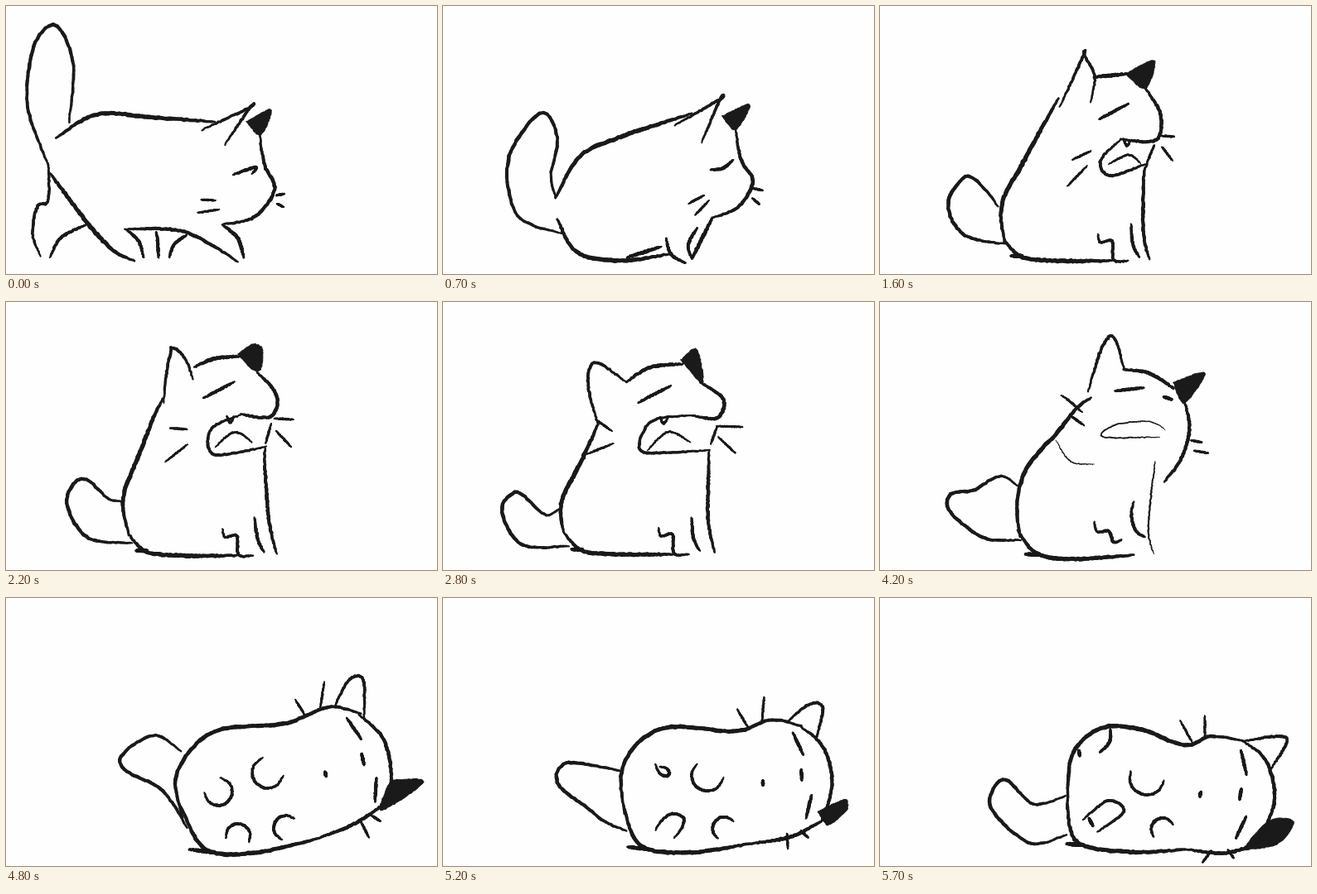
Write an HTML page with a canvas that moves like this. It is 520 px wide and 324 px high and loops after 5.8 s.

```html
<!DOCTYPE html>
<html lang="en">
<head>
<meta charset="utf-8">
<title>Sleepy cat</title>
<style>
html, body { margin: 0; width: 100%; height: 100%; overflow: hidden; background: #fefefe; }
canvas { display: block; }
</style>
</head>
<body>
<canvas id="stage" width="520" height="324"></canvas>
<script>
const LOOP = 5800, STEP = 100, SAMPLES = 60, FLOOR = 304;
const INK = '#1a1a1a', PAPER = '#fefefe';
const ctx = document.getElementById('stage').getContext('2d');

const mix = (a, b, k) => a + (b - a) * k;
const clamp = v => Math.max(0, Math.min(1, v));
const mapPose = (pose, fn) =>
  Object.fromEntries(Object.entries(pose).map(([name, pts]) => [name, pts.map(fn)]));

// A repeated point makes a corner.
const points = text => text.split(' ').map(p => p.split(',').map(Number));
const pose = parts =>
  Object.fromEntries(Object.entries(parts).map(([name, p]) => [name, Array.isArray(p) ? p : points(p)]));

// A leg bends at the knee on its way from the hip to the floor.
const leg = (x, y, foot) => [[x, y], [mix(x, foot, .7), mix(y, FLOOR, .4)], [foot, FLOOR]];

// A paw is part of a circle, with its angles in degrees.
const paw = (x, y, r, from, to) => [0, 1, 2, 3, 4, 5].map(i => {
  const a = mix(from, to, i / 5) * Math.PI / 180;
  return [x + r * Math.cos(a), y + r * Math.sin(a)];
});

const shift = (parts, dx, dy) => mapPose(parts, ([x, y]) => [x + dx, y + dy]);

// Turns parts by an angle while carrying one point to another.
const roll = (parts, angle, [x0, y0], [x1, y1]) => mapPose(parts, ([x, y]) => [
  x1 + (x - x0) * Math.cos(angle) - (y - y0) * Math.sin(angle),
  y1 + (x - x0) * Math.sin(angle) + (y - y0) * Math.cos(angle)
]);

const walk = pose({
  tail: '51,192 26,120 34,48 60,23 81,70 76,141',
  back: '60,160 110,131 180,135 252,140',
  rump: '53,202 98,262 130,296 155,308',
  earNear: '236,150 294,123 294,123 264,168',
  earDark: '290,140 320,125 307,156',
  face: '306,156 312,192 324,222 300,255 261,264',
  eye: '274,204 301,195 297,203',
  cheek1: '235,234 253,235', cheek2: '231,250 257,246',
  whisker1: '326,229 336,227', whisker2: '327,239 335,243',
  belly: '143,270 215,273 280,309',
  hindFar: '51,190 51,235 38,242 32,275 42,303',
  hindNear: leg(98, 264, 53),
  paw1: leg(146, 271, 166), paw2: leg(218, 277, 197), paw3: leg(181, 273, 184),
  chest: leg(262, 265, 287)
});

const crouch = pose({
  tail: '143,275 90,253 79,185 118,129 138,160 130,205 136,232',
  back: '136,232 165,182 215,158 300,130',
  rump: '138,258 162,298 215,308 272,300',
  earNear: '280,144 334,113 334,113 312,165',
  earDark: '337,133 370,119 353,150',
  face: '353,150 360,187 374,212 356,243 325,256',
  eye: '323,198 338,196 350,186',
  cheek1: '296,239 315,229', cheek2: '304,253 321,235',
  whisker1: '372,220 386,223', whisker2: '373,232 382,240',
  belly: '222,304 263,291',
  paw1: '269,280 275,300 293,311', paw2: '307,268 296,288 300,305',
  chest: '325,256 300,306'
});

const seat = pose({
  rump: '150,283 170,303 210,308 280,308',
  belly: '158,302 172,302',
  paw1: '263,276 266,286 280,284 282,307 300,308',
  paw2: '303,264 305,288 313,304',
  chest: '322,192 318,208 318,275 325,306'
});

const sit = { ...seat, ...pose({
  tail: '153,288 102,277 82,240 104,206 127,222 142,242',
  back: '150,285 147,240 172,190 215,112',
  earNear: '217,122 246,59 246,59 259,85 254,116',
  crown: '258,86 298,82',
  earDark: '296,82 331,66 320,100',
  face: '319,98 338,130 333,162 290,161',
  eye: '264,137 300,118',
  mouth: '290,162 266,187 278,205 323,190',
  tongue: '276,191 300,180 314,190',
  fang: '294,162 298,169 302,163',
  chin: '331,168 322,190',
  cheek1: '232,186 255,175', cheek2: '226,218 250,193',
  whisker1: '340,157 355,158', whisker2: '340,170 353,187'
}) };

const yawn = { ...shift(seat, -3, -3), ...pose({
  tail: '152,295 95,293 71,252 90,230 123,257 143,248',
  back: '146,280 143,242 168,190 187,148',
  earNear: '187,148 175,100 184,73 221,97',
  crown: '221,97 250,79 290,75',
  earDark: '287,70 306,57 313,98',
  face: '310,97 338,117 331,140 300,137',
  eye: '235,122 275,101',
  mouth: '300,137 252,144 237,178 270,182 322,179',
  tongue: '247,179 272,157 299,170',
  fang: '262,139 266,147 272,139',
  chin: '331,150 323,172',
  cheek1: '184,142 204,156', cheek2: '173,184 206,171',
  whisker1: '330,150 362,151', whisker2: '332,163 353,183',
  chest: '321,180 320,225 320,265 328,303'
}) };

const drowsy = { ...shift(seat, 2, 3), ...pose({
  tail: '153,291 105,302 64,275 68,257 100,258 130,241 150,249',
  back: '154,290 153,240 175,187 197,148',
  earNear: '203,140 222,66 236,66 249,102',
  crown: '249,102 280,95 320,97',
  earDark: '317,96 358,78 338,118',
  face: '337,117 354,147 350,182 332,209',
  eye: '241,135 282,121',
  nose: '313,130 326,130',
  mouth: '344,178 325,170 285,173 269,185 337,185',
  jaw: '212,188 230,209 258,212',
  cheek1: '175,149 205,167', cheek2: '178,185 202,187',
  whisker1: '358,162 372,157', whisker2: '358,177 378,178',
  chest: '332,209 326,250 324,280 330,304'
}) };

const features = pose({
  eye: '411,145 429,171',
  nose: '429,188 432,202',
  lid: '447,217 445,247',
  dot: '385,210 386,216',
  whisker1: '427,268 438,290', whisker2: '441,263 452,270'
});

const topple = { ...features, ...pose({
  tail: '219,278 188,232 145,209 140,190 178,166 211,185',
  back: '213,265 206,212 250,162 335,152 390,132 428,140',
  rump: '210,250 240,303 300,308 380,290',
  crown: '425,140 455,170 465,215 458,248',
  face: '458,248 420,273 375,291',
  earNear: '396,132 414,99 431,99 432,145',
  earDark: '464,220 504,222 452,257',
  cheek1: '349,123 361,142', cheek2: '384,101 379,134',
  belly: '221,304 252,308',
  paw1: paw(256, 234, 17, 175, -80), paw2: paw(316, 211, 19, 250, 10),
  hindFar: paw(280, 288, 15, 170, 390), hindNear: paw(338, 278, 15, 110, 310)
}) };

const asleep = { ...roll(features, .38, [385, 213], [386, 237]), ...pose({
  tail: '225,286 180,296 133,252 150,219 185,249 224,239',
  back: '226,255 232,190 268,157 315,159 367,178 400,167 438,173',
  rump: '226,250 238,295 300,307 370,304',
  crown: '438,173 466,197 476,245 456,295',
  face: '463,292 420,308 370,304',
  earNear: '438,173 490,169 472,206',
  earDark: '437,305 468,270 499,270 480,297',
  cheek1: '362,148 377,175', cheek2: '392,142 392,168',
  whisker1: '400,305 389,320',
  belly: '225,297 245,299',
  paw1: '278,158 277,174 265,187', paw2: paw(322, 217, 21, 200, 10),
  hindFar: '245,268 275,245 294,258 262,283', hindNear: paw(341, 280, 14, 140, 335),
  pad1: '240,184 241,191', pad2: '252,266 257,276'
}) };

// lift moves the upper body and tail sways the tail on the way to the next pose.
const keys = [
  { at: 0, pose: walk },
  { at: 700, pose: crouch, tail: -13 },
  { at: 1600, pose: sit, lift: [-12, -13] },
  { at: 2800, pose: yawn },
  { at: 3600, pose: drowsy, lift: [0, -30], ease: 2 },
  { at: 4800, pose: topple },
  { at: 5700, pose: asleep }
];

function weight(name) {
  if (/back|rump/.test(name)) return 5.4;
  if (/face|tail|chest|belly|crown/.test(name)) return 4.5;
  return /whisker|cheek|tongue|fang|chin|jaw/.test(name) ? 2.7 : 3.8;
}

function spline(a, b, c, d, t) {
  return b + t * ((c - a) + t * (2 * a - 5 * b + 4 * c - d + t * (3 * (b - c) + d - a))) / 2;
}

// Smooth curve through the points, resampled at equal distances.
function resample(pts) {
  const fine = [], at = i => pts[Math.max(0, Math.min(pts.length - 1, i))];
  for (let i = 0; i < pts.length - 1; i++)
    for (let s = 0; s <= 16; s++)
      fine.push([0, 1].map(j => spline(at(i - 1)[j], at(i)[j], at(i + 1)[j], at(i + 2)[j], s / 16)));
  const dist = [0];
  for (let i = 1; i < fine.length; i++)
    dist.push(dist[i - 1] + Math.hypot(fine[i][0] - fine[i - 1][0], fine[i][1] - fine[i - 1][1]));
  const out = [], total = dist[dist.length - 1];
  for (let n = 0, i = 1; n < SAMPLES; n++) {
    const goal = total * n / (SAMPLES - 1);
    while (i < fine.length - 1 && dist[i] < goal) i++;
    const k = (goal - dist[i - 1]) / (dist[i] - dist[i - 1] || 1);
    out.push([0, 1].map(j => mix(fine[i - 1][j], fine[i][j], k)));
  }
  return out;
}

const names = new Set();
for (const key of keys) {
  key.strokes = {};
  for (const [name, pts] of Object.entries(key.pose)) {
    key.strokes[name] = resample(name === 'earDark' ? [...pts, pts[0]] : pts);
    names.add(name);
  }
}

// A part missing from one of the poses thins out before the halfway point.
function blend(name, a, b, k) {
  const full = weight(name);
  if (!a || !b) return { pts: a || b || [], width: full * clamp(a ? 1 - 2 * k : 2 * k - 1) };
  return { pts: a.map((p, i) => p.map((v, j) => mix(v, b[i][j], k))), width: full };
}

function random(seed) {
  return () => {
    seed = (seed * 1664525 + 1013904223) >>> 0;
    return seed / 4294967296;
  };
}

function brush(name, pts, width, rnd) {
  const rough = pts.map(p => p.map(v => v + rnd() - .5));
  if (name === 'earDark') {
    ctx.lineWidth = 1;
    ctx.beginPath();
    rough.forEach(p => ctx.lineTo(...p));
    ctx.closePath();
    ctx.fill();
    ctx.stroke();
    return;
  }
  for (let i = 1; i < SAMPLES; i++) {
    const swell = Math.sqrt(Math.sin(Math.PI * (i - .5) / (SAMPLES - 1)));
    ctx.lineWidth = width * (.45 + .5 * swell) * (.9 + .2 * rnd());
    ctx.beginPath();
    ctx.moveTo(...rough[i - 1]);
    ctx.lineTo(...rough[i]);
    ctx.stroke();
  }
}

function draw(time) {
  const now = Math.floor(time % LOOP / STEP) * STEP;
  const i = Math.min(keys.length - 2, keys.findLastIndex(key => key.at <= now));
  const from = keys[i], to = keys[i + 1];
  const p = (now - from.at) / (to.at - from.at);
  const k = p ** (from.ease || 1), swing = Math.sin(Math.PI * p);
  const [dx, dy] = from.lift || [0, 0];
  const rnd = random(now + 7);

  ctx.fillStyle = PAPER;
  ctx.fillRect(0, 0, 520, 324);
  ctx.fillStyle = ctx.strokeStyle = INK;
  ctx.lineCap = ctx.lineJoin = 'round';
  for (const name of names) {
    const { pts, width } = blend(name, from.strokes[name], to.strokes[name], k);
    if (!pts.length || width < .5) continue;
    const sway = name === 'tail' && from.tail || 0;
    const moved = pts.map(([x, y], n) => {
      const high = clamp((280 - y) / 130) * swing;
      return [x + dx * high + sway * swing * Math.sin(Math.PI * n / SAMPLES), y + dy * high];
    });
    brush(name, moved, width, rnd);
  }
}

const start = performance.now();
function tick() {
  draw(performance.now() - start);
  requestAnimationFrame(tick);
}
tick();
</script>
</body>
</html>
```
